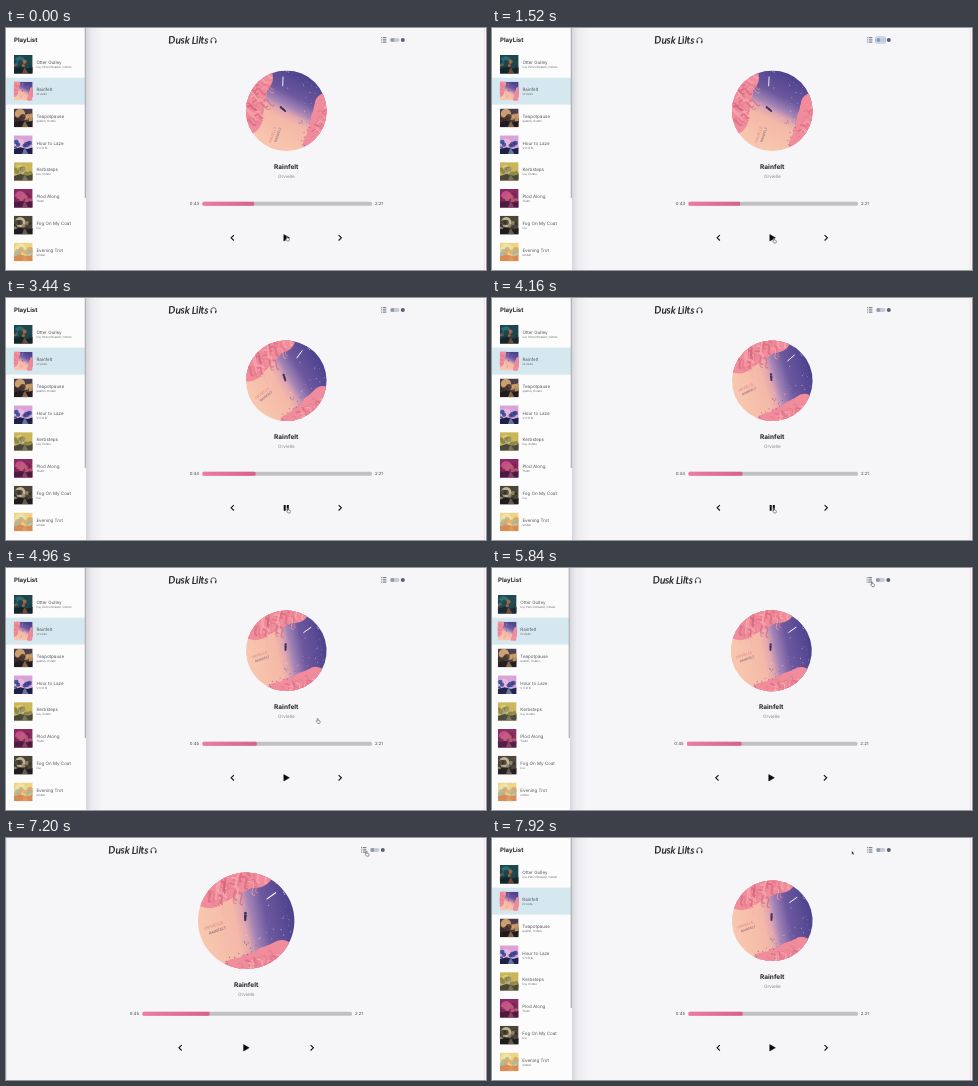
Animation of 480 by 242 pixels, one loop 8000 ms. Source, as an HTML page:

```html
<!DOCTYPE html>
<html lang="en">
<head>
<meta charset="utf-8">
<title>Music player</title>
<style>
html, body { margin: 0; width: 100%; height: 100%; overflow: hidden; background: #f6f6f9; }
svg { display: block; width: 100%; height: 100%; }
text { font-family: Inter, "Open Sans", sans-serif; text-rendering: geometricPrecision; }
.mid { text-anchor: middle; }
</style>
</head>
<body>
<svg id="stage" viewBox="0 0 480 242">
  <defs>
    <linearGradient id="sky" gradientUnits="userSpaceOnUse" x1="45" y1="-88" x2="-40" y2="82">
      <stop offset="0" stop-color="#4c428d"/><stop offset=".3" stop-color="#6c589f"/>
      <stop offset=".45" stop-color="#a283b5"/><stop offset=".54" stop-color="#e0a6b0"/>
      <stop offset=".64" stop-color="#f4b9a7"/><stop offset="1" stop-color="#f8c6ae"/>
    </linearGradient>
    <linearGradient id="fade">
      <stop offset="0" stop-color="#b4b4be" stop-opacity=".5"/>
      <stop offset=".35" stop-color="#c4c4cc" stop-opacity=".2"/>
      <stop offset="1" stop-color="#ccc" stop-opacity="0"/>
    </linearGradient>
    <linearGradient id="pink">
      <stop offset="0" stop-color="#f07aa2"/><stop offset="1" stop-color="#d9608a"/>
    </linearGradient>
    <clipPath id="round"><circle r="100"/></clipPath>
    <clipPath id="square"><rect x="-100" y="-100" width="200" height="200"/></clipPath>
    <g id="cover"></g>
  </defs>
  <rect width="480" height="242" fill="#f6f6f9"/>
  <rect x="477.5" width="1.5" height="242" fill="#f8e3ed"/>
  <rect width=".8" height="242" fill="#d9d9de"/>

  <g id="logo">
    <text y="15.6" rotate="-4 2 -3 3 0 0 -3 3 -2 3" style="font:italic 400 9.9px Lato,sans-serif"
      fill="#16161a" stroke="#16161a" stroke-width=".22">Dusk Lilts</text>
    <g fill="none" stroke="#222" stroke-width=".7" stroke-linecap="round">
      <path d="M42.4 13.5v-1.2a2.6 2.6 0 0 1 5.2 0v1.2"/>
      <path d="M42.8 13.2v1.6M47.2 13.2v1.6" stroke-width="1.1"/>
    </g>
  </g>

  <g id="tools">
    <path d="M1.8 9.7h3.6M1.8 11.9h3.6M1.8 14.1h3.6M.2 9.7h.9M.2 11.9h.9M.2 14.1h.9" stroke="#3f434d" stroke-width=".8"/>
    <rect id="ring" x="8.4" y="8.9" width="10.2" height="6.2" rx="2" fill="#e3f1fb" stroke="#8fb2e0" stroke-width=".8"/>
    <rect x="9.3" y="10" width="9.2" height="4" rx="2" fill="#c5ccd8"/>
    <circle cx="11.3" cy="12" r="2" fill="#8e99ac"/>
    <circle cx="21.8" cy="12" r="2" fill="#565f70"/>
  </g>

  <g id="disc"><use href="#cover" clip-path="url(#round)"/></g>
  <g id="song">
    <text class="mid" font-size="6.5" font-weight="700" fill="#222226">Rainfelt</text>
    <text class="mid" y="9.7" font-size="4.6" fill="#85858b">Orvielle</text>
  </g>

  <rect id="track" y="173.8" height="4" rx="1.6" fill="#c1c1c4"/>
  <rect id="fill" y="173.8" height="4" rx="1.2" fill="url(#pink)"/>
  <text id="now" class="mid" y="177.2" font-size="4.3" fill="#44444a"></text>
  <text id="total" class="mid" y="177.2" font-size="4.3" fill="#44444a">2:21</text>

  <path id="prev" d="M1.4-2.7-1.4 0 1.4 2.7" fill="none" stroke="#111" stroke-width="1.1"/>
  <path id="next" d="M-1.4-2.7 1.4 0-1.4 2.7" fill="none" stroke="#111" stroke-width="1.1"/>
  <g id="main">
    <path id="play" d="M-2.4-3.2 3.2 0-2.4 3.2z" fill="#0b0b0d" stroke="#0b0b0d" stroke-width=".5" stroke-linejoin="round"/>
    <path id="pause" d="M-1.5-2.9V2.9M1.6-2.9V2.9" stroke="#0b0b0d" stroke-width="2"/>
  </g>

  <g id="side">
    <rect x="80" width="18" height="242" fill="url(#fade)"/>
    <rect width="80" height="242" fill="#fcfcfd"/>
    <text x="8" y="13.6" font-size="6.1" font-weight="700" fill="#26262c">PlayList</text>
    <rect y="49.6" width="80" height="27" fill="#d6e8ef"/>
    <g id="rows"></g>
    <rect x="78.7" width="1.3" height="170" fill="#b3b3b8"/>
  </g>

  <g id="cursor">
    <path id="hand" d="M-.5-.8Q.1-1.3.5-.5V1L2 1.4Q2.6 1.6 2.4 2.6L2 4H0L-1.4 2Q-1.3 1.3-.5 1.8z" fill="#fff" stroke="#333" stroke-width=".5"/>
    <path id="arrow" d="M-.8-1.2V2.2L0 1.5.6 2.8 1.2 2.5.7 1.3H1.8z" fill="#111" stroke="#fff" stroke-width=".25"/>
  </g>
</svg>
<script>
const $ = id => document.getElementById(id);
const LOOP = 8000, LENGTH = 141;

function seeded(n) {
  return () => (n = (n * 16807) % 2147483647) / 2147483647;
}

const blob = (x, y, r, fill, o = 1) =>
  `<circle cx="${x.toFixed(1)}" cy="${y.toFixed(1)}" r="${r.toFixed(1)}" fill="${fill}" opacity="${o}"/>`;

// A bank of cloud along a line, textured with small curls.
function cloud(rnd, [x0, y0], [x1, y1], size) {
  let s = "";
  for (let i = 0; i < 11; i++) {
    const u = i / 10;
    s += blob(mix(x0, x1, u), mix(y0, y1, u), size * (0.75 + rnd() * 0.35), "#f08c9c");
  }
  for (let i = 0; i < 36; i++) {
    const u = rnd(), r = size * (0.12 + rnd() * 0.2);
    const x = mix(x0, x1, u) + (rnd() - 0.5) * size * 1.4;
    const y = mix(y0, y1, u) + (rnd() - 0.5) * size * 1.4;
    s += `<path d="M${x.toFixed(1)} ${y.toFixed(1)}q${r} ${-r * 1.6} ${r * 2} 0t${r * 1.5} ${r * 0.6}" fill="none" ` +
      `stroke="${["#d9667f", "#f9aeb0", "#e27b8e"][i % 3]}" stroke-width="${2 + rnd() * 3}" opacity=".75"/>`;
  }
  return s;
}

function coverArt() {
  const rnd = seeded(77);
  let s = '<rect x="-100" y="-100" width="200" height="200" fill="url(#sky)"/>';
  for (let i = 0; i < 30; i++) s += blob(rnd() * 130 - 40, rnd() * 120 - 100, 0.6 + rnd() * 0.9, "#f0d8ec", 0.6);
  s += '<path d="M-9-62-8-84" stroke="#fff" stroke-width="2.2" stroke-linecap="round"/>';
  s += cloud(rnd, [-70, -82], [-100, 32], 34);
  s += cloud(rnd, [98, -16], [64, 96], 26);
  for (let i = 0; i < 14; i++) s += blob(30 + rnd() * 30, 10 + rnd() * 80, 1.4, "#765a94", 0.7);
  s += '<g transform="translate(-8 -4) rotate(-50)"><path d="M-3-4H3L2 9H-2z" fill="#3d2f60"/>' + blob(0, -7, 3, "#3d2f60") + "</g>";
  s += '<g transform="translate(-31 60) rotate(-71)" text-anchor="middle" font-weight="500">' +
    '<text font-size="8.8" fill="#df8d8c">ORVIELLE</text><text y="12" x="4" font-size="8" fill="#8a6685">RAINFELT</text></g>';
  return s;
}

// Little landscape: sky, glow, foliage, ground, accent.
function scene(seed, [sky, glow, leaf, ground, accent]) {
  const rnd = seeded(seed * 911);
  let s = `<rect x="-100" y="-100" width="200" height="200" fill="${sky}"/>`;
  s += blob(rnd() * 120 - 40, -50 + rnd() * 40, 55, glow, 0.85);
  for (let i = 0; i < 13; i++) s += blob(rnd() * 200 - 100, rnd() * 90 - 30, 14 + rnd() * 18, i % 3 ? leaf : accent, 0.8);
  s += `<path d="M-100 48-30 28 40 46 100 30V100H-100z" fill="${ground}"/>`;
  s += `<path d="M-15 100 8 40 22 42 55 100z" fill="${accent}" opacity=".55"/>`;
  return s;
}

const songs = [
  ["Otter Gulley", "Ivu, Pencil Drawer, Ostelo", "#1d474c #2f7377 #1c3b42 #14262c #c4683f"],
  ["Rainfelt", "Orvielle", ""],
  ["Teapotpause", "quellin, Ostelo", "#4a3d4c #e0b078 #3a2a26 #221a1c #d5a56a"],
  ["Hour to Laze", "V O R B", "#d9a3d8 #efb9dd #2f3f8a #1d2148 #a9b9ea"],
  ["Kerbsteps", "Ivu, Ostelo", "#c9b65a #e2cf73 #857c3a #4a4838 #a09a78"],
  ["Plod Along", "Trulm", "#8a2a62 #d0558f #74224f #4b1c42 #c2607a"],
  ["Fog On My Coat", "Ivu", "#4b4538 #d8c9a4 #33302a #1d1d20 #a08f72"],
  ["Evening Trot", "umbel", "#ecd58a #f5e3a6 #a9b59a #d98a55 #e6a860"]
];

const clamp = v => Math.min(1, Math.max(0, v));
const mix = (a, b, u) => a + (b - a) * u;

$("cover").innerHTML = coverArt();
$("rows").innerHTML = songs.map(([name, by, tones], i) => {
  const y = 27 + i * 26.8;
  const art = tones ? scene(i + 3, tones.split(" ")) : '<use href="#cover"/>';
  return `<g transform="translate(17.3 ${y + 9.3}) scale(.0935)"><g clip-path="url(#square)">${art}</g></g>` +
    `<text x="30.4" y="${y + 9.1}" font-size="4.5" fill="#55555c">${name}</text>` +
    `<text x="30.4" y="${y + 13.1}" font-size="2.9" fill="#66666d">${by}</text>`;
}).join("");

// cubic-bezier(.25, .1, .25, 1)
function ease(x) {
  if (x <= 0 || x >= 1) return clamp(x);
  const bez = (a, b, u) => 3 * a * u * (1 - u) ** 2 + 3 * b * u * u * (1 - u) + u ** 3;
  let lo = 0, hi = 1;
  for (let i = 0; i < 24; i++) {
    const m = (lo + hi) / 2;
    if (bez(0.25, 0.25, m) < x) lo = m; else hi = m;
  }
  return bez(0.1, 1, lo);
}

const path = [
  [0, 281, 209], [400, 281, 209], [1100, 282, 211], [4650, 282, 211],
  [5500, 380, 14.6], [6200, 380, 14.6], [6900, 360.6, 14.2], [LOOP, 360.6, 14.2]
];
function pointer(t) {
  const i = path.findIndex(k => k[0] > t);
  const a = path[i - 1], b = path[i];
  const u = (t - a[0]) / (b[0] - a[0]), s = u * u * (3 - 2 * u);
  return [mix(a[1], b[1], s), mix(a[2], b[2], s)];
}

const move = (id, x, y, more = "") => $(id).setAttribute("transform", `translate(${x} ${y}) ${more}`);
const show = (id, on) => $(id).setAttribute("visibility", on ? "visible" : "hidden");

function draw(t) {
  const p = ease((t - 5820) / 500) - ease((t - 7440) / 500);
  const playing = t >= 1600 && t < 4480;
  const spin = (Math.min(Math.max(t, 1600), 4480) - 1600) * 0.018;
  const sec = 43 + (Math.min(Math.max(t, 2300), 4480) - 2300) / 1000;

  move("side", -80 * p, 0);
  $("side").setAttribute("opacity", 1 - p);
  move("logo", mix(162.5, 102.5, p), 0);
  move("tools", mix(375, 355, p), 0);
  move("disc", mix(280.3, 240.2, p), 82.8, `scale(${mix(0.403, 0.482, p)}) rotate(${spin})`);
  move("song", mix(280.3, 240.2, p), mix(140.6, 148.5, p));

  const x = mix(196.5, 136.5, p), w = mix(169.5, 209.5, p);
  $("track").setAttribute("x", x);
  $("track").setAttribute("width", w);
  $("fill").setAttribute("x", x);
  $("fill").setAttribute("width", w * sec / LENGTH);
  $("now").textContent = "0:" + Math.floor(sec);
  $("now").setAttribute("x", mix(188.4, 128.3, p));
  $("total").setAttribute("x", mix(373, 353, p));

  move("prev", mix(226.5, 174.3, p), 209.8);
  move("main", mix(280.2, 240, p), 209.8);
  move("next", mix(334, 306, p), 209.8);
  show("play", !playing);
  show("pause", playing);
  show("ring", t >= 800 && t < 1640);

  move("cursor", ...pointer(t));
  show("arrow", t >= 7440);
  show("hand", t < 7440);
}

const start = performance.now();
function tick() {
  draw((performance.now() - start) % LOOP);
  requestAnimationFrame(tick);
}
tick();
</script>
</body>
</html>
```
